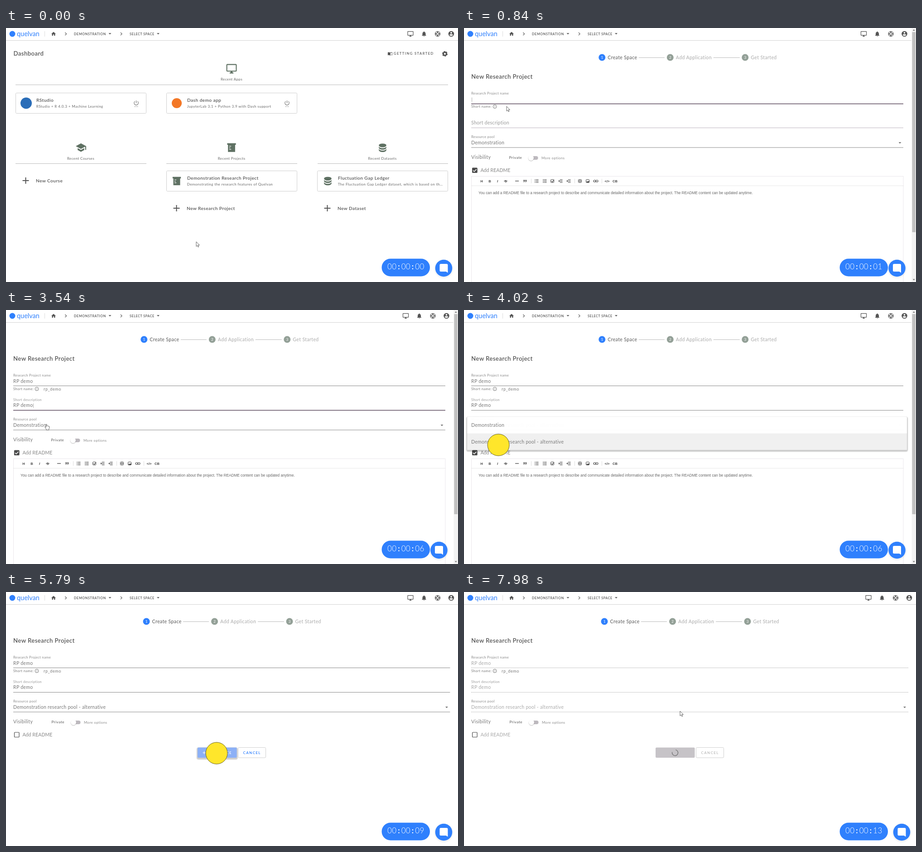
An HTML page for the animation above (8 s loop, 998x561 px).

```html
<!DOCTYPE html>
<html lang="en">
<head>
<meta charset="utf-8">
<title>Create a research project</title>
<style>
html, body { margin: 0; width: 100%; height: 100%; overflow: hidden; background: #fff; }
svg { display: block; width: 998px; height: 561px; font-family: Lato, "Open Sans", sans-serif; }
text { white-space: pre; }
</style>
</head>
<body>
<svg id="stage" viewBox="0 0 998 561"></svg>
<script>
const LOOP = 8000, BLUE = '#2f80fd', DARK = '#555', GREEN = '#5f7163';
const BRAND = 'quelvan', DATASET = 'Fluctuation Gap Ledger';
const BOLD = 'font-weight="600"', MID = 'text-anchor="middle"';

const ICONS = {
  home: 'M10 20v-6h4v6h5v-8h3L12 3 2 12h3v8z',
  chevron: 'M10 6L8.6 7.4 13.2 12l-4.6 4.6L10 18l6-6z',
  drop: 'M7 10l5 5 5-5z',
  monitor: 'M21 2H3q-2 0-2 2v12q0 2 2 2h7v2H8v2h8v-2h-2v-2h7q2 0 2-2V4q0-2-2-2zm0 14H3V4h18z',
  bell: 'M12 22q2 0 2-2h-4q0 2 2 2zm6-6v-5c0-3-1.6-5.6-4.5-6.3V4a1.5 1.5 0 0 0-3 0v.7C7.6 5.4 6 7.9 6 11v5l-2 2v1h16v-1z',
  user: 'M12 2a10 10 0 1 0 0 20 10 10 0 0 0 0-20zm0 3a3 3 0 1 1 0 6 3 3 0 0 1 0-6zm0 14.2c-2.5 0-4.7-1.3-6-3.2 0-2 4-3.1 6-3.1s6 1.1 6 3.1c-1.3 1.9-3.5 3.2-6 3.2z',
  school: 'M5 13.2v4l7 3.8 7-3.8v-4L12 17zM12 3L1 9l11 6 9-4.9V17h2V9z',
  plus: 'M19 13h-6v6h-2v-6H5v-2h6V5h2v6h6z',
  power: 'M13 3h-2v10h2zm4.8 2.2l-1.4 1.4A7 7 0 1 1 7.6 6.6L6.2 5.2a9 9 0 1 0 11.6 0z',
  book: 'M12 6Q7 3 1 5v14q6-2 11 1 5-3 11-1V5q-6-2-11 1zm1.5 2q4-2 8-1v10q-4-1-8 1z',
  project: 'M1 1h22v4h-2v18H3V5H1zM6 8v1.4h5V8zm0 4v1.4h3V12zm0 4v1.400h5V16z',
  data: 'M4 7a8 4 0 0 1 16 0a8 4 0 0 1-16 0zM4 9v3a8 4 0 0 0 16 0V9a8 4 0 0 1-16 0zM4 14v3a8 4 0 0 0 16 0v-3a8 4 0 0 1-16 0z'
};
const ARROW = 'M0 0v10.5l2.4-2.2 1.7 3.7 1.7-.8-1.7-3.6h3.2z';
const HAND = 'M.5.8v6L-1 6-2 7.2 1 11.5V13h5.6v-1.5l1-3V5L2.4 3.6V.8q-1-1.4-1.9 0z';

const ramp = (t, a, b) => Math.min(1, Math.max(0, (t - a) / (b - a)));
const ease = u => u * u * (3 - 2 * u);
const mix = (a, b, u) => a + (b - a) * u;

const txt = (x, y, s, size = 10.5, fill = '#777', gap = .3, more = '') =>
  `<text x="${x}" y="${y}" font-size="${size}" fill="${fill}" letter-spacing="${gap}" ${more}>${s}</text>`;
const box = (x, y, w, h, fill, more = '') =>
  `<rect x="${x}" y="${y}" width="${w}" height="${h}" fill="${fill}" ${more}/>`;
const dot = (x, y, r, fill, more = '') => `<circle cx="${x}" cy="${y}" r="${r}" fill="${fill}" ${more}/>`;
const ring = (x, y, r, w, color, more = '') => dot(x, y, r, 'none', `stroke="${color}" stroke-width="${w}" ${more}`);
const line = (x1, x2, y, color = '#bbb', w = 1, more = '') =>
  `<path d="M${x1} ${y}H${x2}" stroke="${color}" stroke-width="${w}" ${more}/>`;
const path = (d, x, y, more) => `<path d="${d}" transform="translate(${x} ${y})" ${more}/>`;
const icon = (name, x, y, size, color = DARK) =>
  `<path d="${ICONS[name]}" fill="${color}" fill-rule="evenodd" transform="translate(${x - size / 2} ${y - size / 2}) scale(${size / 24})"/>`;
const shadow = (x, y, w, h, r = 2) =>
  [3, 2, 1].map(k => box(x - k, y - k + 2, w + 2 * k, h + 2 * k, '#000', `opacity=".07" rx="${r + k}"`)).join('');

function topBar(dx) {
  return dot(14, 13, 6.5, BLUE) + txt(24, 18, BRAND, 14.5, BLUE, 0) +
    box(85, 7, 1, 12, '#ddd') + icon('home', 105, 13, 12) + icon('chevron', 132, 13, 14) +
    txt(150, 15.6, 'DEMONSTRATION', 7.2, DARK, .65, BOLD) + icon('drop', 229.5, 12.5, 14) +
    icon('chevron', 254.5, 13, 14) + txt(273, 15.6, 'SELECT SPACE', 7.2, DARK, .55, BOLD) +
    icon('drop', 336, 12.5, 14) + icon('monitor', 893 + dx, 13, 14.5) + icon('bell', 923 + dx, 13, 14) +
    ring(953 + dx, 13, 5.5, 1.2, DARK) + ring(953 + dx, 13, 2.5, 1.2, DARK) +
    ring(953 + dx, 13, 4, 2.4, DARK, 'pathLength="100" stroke-dasharray="10 15" stroke-dashoffset="5"') +
    icon('user', 983 + dx, 13, 15) + line(0, 998 + dx, 27.5, '#d2d2d2');
}

const card = (x, y, w, h, title, note) =>
  box(x + .5, y + .5, w, h, '#fff', 'rx="2" stroke="#cfcfcf"') +
  txt(x + 46, y + 20, title, 10.2, DARK, .4, BOLD) + txt(x + 45.7, y + 32.5, note, 8, '#666', .45);
const heading = (x, y, s) => txt(x, y, s, 8, '#666', .4, MID);
const create = (x, y, s) => icon('plus', x + 22.5, y, 24) + txt(x + 45, y + 3.6, s, 10.2, DARK, .4, BOLD);
const power = (x, y) => icon('power', x, y, 14, '#777') +
  [-3, 0, 3].map(d => box(x + d - .7, y + 7.5, 1.4, 1.2, '#777')).join('');

function dashboard() {
  return txt(16.5, 61.2, 'Dashboard', 13.2, DARK, .4, BOLD) + icon('book', 848, 57, 11) +
    txt(856, 59.3, 'GETTING STARTED', 7.5, DARK, 1.5, BOLD) +
    ring(969, 57, 3.5, 3, DARK) + ring(969, 57, 5.3, 1.6, DARK, 'pathLength="24" stroke-dasharray="2.4 1.6"') +
    icon('monitor', 498, 90, 25, GREEN) + heading(498, 116.2, 'Recent Apps') + line(21, 976, 125.5) +
    card(21, 143, 288, 45, 'RStudio', 'RStudio + R 4.0.3 + Machine Learning') + dot(44.5, 166, 12.5, '#2a6db8') + power(287.5, 165.5) +
    card(354, 143, 288, 45, 'Dash demo app', 'JupyterLab 3.1 + Python 3.9 with Dash support') + dot(377, 166, 11, '#f37726') + power(620.5, 165.5) +
    icon('school', 165.5, 264, 25, GREEN) + heading(165, 290.5, 'Recent Courses') + line(21, 310, 299.5) +
    icon('project', 498, 264, 21, GREEN) + heading(498, 290.5, 'Recent Projects') + line(354, 643, 299.5) +
    icon('data', 831.5, 264.5, 25, GREEN) + heading(831, 290.5, 'Recent Datasets') + line(688, 976, 299.5) +
    create(21, 337, 'New Course') +
    card(354, 315, 288, 45, 'Demonstration Research Project', 'Demonstrating the research features of Quelvan') +
    icon('project', 377, 338, 20, GREEN) + create(354, 398, 'New Research Project') +
    card(687, 315, 288, 45, DATASET, `The ${DATASET} dataset, which is based on th…`) +
    icon('data', 710.5, 338, 25, GREEN) + create(687, 398, 'New Dataset');
}

function steps(x) {
  const step = (n, cx, s, fill, color) => dot(cx, 65, 7.5, fill) +
    txt(cx, 68, n, 8, '#fff', 0, MID) + txt(cx + 12.5, 69, s, 10.5, color, .4);
  return step(1, x, 'Create Space', BLUE, '#555') + line(x + 81, x + 138, 65.5) +
    step(2, x + 150.5, 'Add Application', '#93a097', '#aaa') + line(x + 246, x + 304, 65.5) +
    step(3, x + 316, 'Get Started', '#93a097', '#aaa');
}

function editor(y, right) {
  const mid = y + 11;
  const tool = (x, s, more = '') =>
    txt(x, y + 13.7, s, 7.5, '#444', 0, `${MID} font-weight="700" font-family="Liberation Sans, sans-serif" ${more}`);
  const bars = (x, lead) => [-3, 0, 3].map(d =>
    box(x - 1.5, y + 10.5 + d, 6, 1.1, '#444') + box(x - 4, y + 10.4 + d, lead, 1.3, '#444')).join('');
  const frame = x => box(x - 3.5, y + 7.7, 7, 6.6, 'none', 'rx="1" stroke="#444"');
  const quote = x => path('M0-2.500h2.500V0L1.500 2.500H0L.8 0H0z', x, mid, 'fill="#444"');
  return `<path d="M16.5 561V${y + .5}H${right}V561" fill="none" stroke="#e0dbe1" stroke-dasharray="2 1"/>` +
    line(17, right, y + 21.5, '#dcdcdc', 1, 'stroke-dasharray="2 1"') +
    tool(39, 'H') + tool(57, 'B') + tool(74, 'I', 'font-style="italic"') +
    tool(92, 'S') + line(88, 96, mid, '#444') + line(113, 121, mid, '#444', 1.3) +
    quote(131.5) + quote(135.5) +
    [148, 244, 304].map(x => box(x, y + 6, 1, 10, '#ddd')).join('') +
    bars(160, 1.4) + bars(178, 1.8) + frame(195) +
    path('M-2 0l2 2 4-5', 195, mid, 'fill="none" stroke="#444" stroke-width="1.2"') +
    bars(213, 0) + path('M-4-2l3 2-3 2z', 213, mid, 'fill="#444"') +
    bars(231, 0) + path('M-2-2l-3 2 3 2z', 231, mid, 'fill="#444"') +
    frame(256) + line(252, 260, mid, '#444') + box(255.5, y + 8, 1, 6, '#444') +
    frame(273) + path('M-3 3l2-3 1.5 1.5 1.5-2 2 3.5z', 273, mid, 'fill="#444"') +
    [288.5, 293.5].map(x => box(x - 2.5, y + 9, 5, 4, 'none', 'rx="2" stroke="#444" stroke-width="1.1"')).join('') +
    tool(316, '&lt;/&gt;') + tool(333.5, 'CB') +
    txt(32, y + 40.2, 'You can add a README file to a research project to describe and communicate detailed information about the project. The README content can be updated anytime.',
      8.24, '#666', 0, 'font-family="Liberation Sans, Arial, sans-serif"');
}

const SAMPLE = 'RP demo';
const NAME_KEYS = [930, 1050, 1260, 1350, 1440, 1650, 1830];
const NOTE_KEYS = [2550, 2640, 2700, 2760, 2850, 3090, 3090];
const typed = (t, keys) => SAMPLE.slice(0, keys.filter(k => t >= k).length);

function buttons(t, off) {
  let s = '';
  if (off) {
    s += box(423, 343.5, 86.5, 22.5, '#c6c3c7', 'rx="2"');
    if (t > 6450) {
      const grow = .5 - .5 * Math.cos((t - 6660) / 880 * 2 * Math.PI);
      s += ring(466, 355, 6.5, 1.4, '#777',
        `pathLength="100" stroke-dasharray="${4 + 72 * grow} 100" transform="rotate(${(t - 7980) * .3 - 80} 466 355)"`);
    }
  } else {
    s += shadow(423, 343.5, 86.5, 22.5) + box(423, 343.5, 86.5, 22.5, t > 5340 ? '#8cb0f6' : BLUE, 'rx="2"') +
      icon('plus', 437.5, 355, 11, '#fff') + txt(444.5, 357.8, 'ADD SPACE', 7.8, '#fff', 1.3, BOLD);
  }
  return s + box(512.5, 343.5, 61, 22.5, '#fff', 'rx="2" stroke="#d0d0d0"') +
    txt(523.5, 357.9, 'CANCEL', 8, off ? '#bbb' : BLUE, 1.4, BOLD);
}

function form(t, dx, readme) {
  const right = 980.5 + dx, d = t >= 930 ? 1 : 0, off = t >= 6060, lit = off ? '#aaa' : '#777';
  const name = typed(t, NAME_KEYS), note = typed(t, NOTE_KEYS), side = readme ? 0 : 1;
  const focus = t < 2010 ? 0 : t < 3600 ? 1 : t < 4890 ? 2 : 3;
  const up = ease(ramp(t, 2010, 2250));
  const caret = n => focus === n ? '<tspan fill="#333" font-weight="300">|</tspan>' : '';
  const rule = (n, y) => {
    if (off) return line(16, right, y, '#999', 1, 'stroke-dasharray="1.5 1.5"');
    const w = (right - 16) / 2 * (n === 1 ? up : 1), c = (right + 16) / 2;
    return line(16, right, y, n === 1 && focus < 1 ? '#bfb6c0' : '#8a8a8a') +
      (focus === n ? line(c - w, c + w, y, '#5c4a5e', 1.7) : '');
  };
  const pool = t < 4020 ? 'Demonstration' : 'Demonstration research pool - alternative';
  return steps(310 + dx / 2) + txt(16, 112, 'New Research Project', 13.2, DARK, .4, BOLD) +
    txt(16, 147, 'Research Project name', 7.7, '#888', .3) + txt(16, 161, name + caret(0), 10.5, lit) + rule(0, 167.5) +
    txt(16, 176.3 + d, 'Short name:', 7.7, '#777', .4) + ring(68, 173.5 + d * .8, 3.9, .9, '#666') +
    txt(68, 176 + d * .8, '?', 6.5, '#666', 0, MID) +
    txt(83, 178, name.toLowerCase().replace(' ', '_'), 9, '#777', .6) +
    txt(16, mix(212.6 + d, 200.5, up), 'Short description', mix(10.5, 7.7, up), '#999', .3) +
    txt(16, 213.5, note + caret(1), 10.5, lit) + rule(1, 220.5 + d) +
    txt(16, 243.2 + d, 'Resource pool', 7.7, '#888', .3) + txt(16, 257.2 + d, pool, 10.5, lit) +
    icon('drop', right - 7.5, 253.5 + d, 14, '#666') + rule(2, 264 + d) +
    txt(16, 289.2 + d, 'Visibility', 10.5, '#777', .4) + txt(99.5 + side, 289 + d, 'Private', 8.3, DARK, .45) +
    box(143 + side, 283 + d, 20.5, 8, '#bdb9be', 'rx="4"') + dot(148 + side, 288 + d, 6.5, '#000', 'opacity=".18"') +
    dot(148 + side, 287 + d, 6, '#fff') + txt(171 + side, 289.5 + d, 'More options', 7.8, '#888', .45) +
    box(18.5, 309 + d, 10.5, 10.5, readme ? '#4a4a4a' : '#fff', 'rx="1" stroke="#4a4a4a" stroke-width="1.2"') +
    (readme ? path('M-3.5 0l2.5 2.5 5-5', 23.5, 314.5 + d, 'fill="none" stroke="#fff" stroke-width="1.5"') : '') +
    txt(36.5, 318 + d, 'Add README', 10.5, off ? '#aaa' : '#888', .1) +
    (readme ? editor(327 + d, right) : buttons(t, off));
}

function poolMenu(t) {
  const a = ramp(t, 3600, 3670) * (1 - ramp(t, 4020, 4110));
  return a ? `<g opacity="${a}">` + shadow(7, 236, 971, 73) + box(7, 236, 971, 73, '#fff', 'rx="2"') +
    box(7, t > 3810 ? 272.5 : 236, 971, 36.5, '#f0f0f0') + txt(16, 258, 'Demonstration') +
    txt(16, 294.5, 'Demonstration research pool - alternative') + '</g>' : '';
}

const scrollbar = () => box(988.5, 0, 9.5, 561, '#f2f2f2') + box(989.5, 9, 7.5, 442, '#c1c1c1') +
  path('M-2.5 1.5h5L0-1.5z', 993.3, 4.5, 'fill="#777"') + path('M-2.5-1.5h5L0 1.5z', 993.3, 556, 'fill="#777"');

function overlay(t, dx) {
  const sec = String(Math.floor((t + 150) / 600)).padStart(2, '0');
  const digit = (c, i) => txt(847 + 10.2 * i, 533, c, 17, '#fff', 0, `${MID} font-weight="${c === ':' ? 700 : 300}"`);
  const chat = 966.5 + dx;
  return box(829.5, 509.5, 106.5, 39, BLUE, 'rx="19.5"') + [...`00:00:${sec}`].map(digit).join('') +
    dot(chat, 532, 21, '#000', 'opacity=".04"') + dot(chat, 530.5, 18.8, BLUE) +
    path('M-6.5-9.5h13q2.5 0 2.5 2.5V10l-4-2.5H-6.5Q-9 7.5-9 5V-7q0-2.5 2.5-2.5z', chat, 530.5, 'fill="#fff"');
}

const MOVES = [[0, 420, 472], [120, 420, 472], [390, 432, 400], [600, 432, 400], [810, 94, 173], [3270, 94, 173],
  [3510, 88, 252], [3690, 88, 252], [3870, 76, 298], [4110, 76, 298], [4200, 76, 303], [4500, 76, 303],
  [4620, 24, 316], [4890, 24, 316], [5340, 465, 356], [6060, 465, 356], [6360, 477, 263], [LOOP, 477, 263]];
const CLICKS = [390, 3555, 3900, 4650, 5700];

function pointer(t) {
  const i = MOVES.findIndex(m => m[0] > t), [a, ax, ay] = MOVES[i - 1], [b, bx, by] = MOVES[i];
  const u = ease(ramp(t, a, b)), x = mix(ax, bx, u), y = mix(ay, by, u);
  const hand = (t > 330 && t < 600) || (t > 3480 && t < 4020) || (t > 5300 && t < 6060);
  const hit = CLICKS.find(c => t >= c && t < c + 300);
  const alpha = hit ? Math.min(ramp(t, hit - 20, hit + 40), 1 - ramp(t, hit + 210, hit + 300)) : 0;
  return path(hand ? HAND : ARROW, x, y, 'fill="#fff" stroke="#555" stroke-width=".9"') +
    (hit ? dot(x, y, 24, '#ffe62b', `stroke="#6b6420" opacity="${alpha}"`) : '');
}

function scene(t) {
  const onForm = t >= 600, readme = t < 4740, bar = onForm && readme, dx = bar ? -10.5 : 0;
  return box(0, 0, 998, 561, '#fff') + topBar(dx) + (onForm ? form(t, dx, readme) : dashboard()) +
    poolMenu(t) + (bar ? scrollbar() : '') + overlay(t, dx) + pointer(t);
}

const stage = document.getElementById('stage');
let shown = '';
function tick() {
  const next = scene(performance.now() % LOOP);
  if (next !== shown) stage.innerHTML = shown = next;
  requestAnimationFrame(tick);
}
tick();
</script>
</body>
</html>
```
